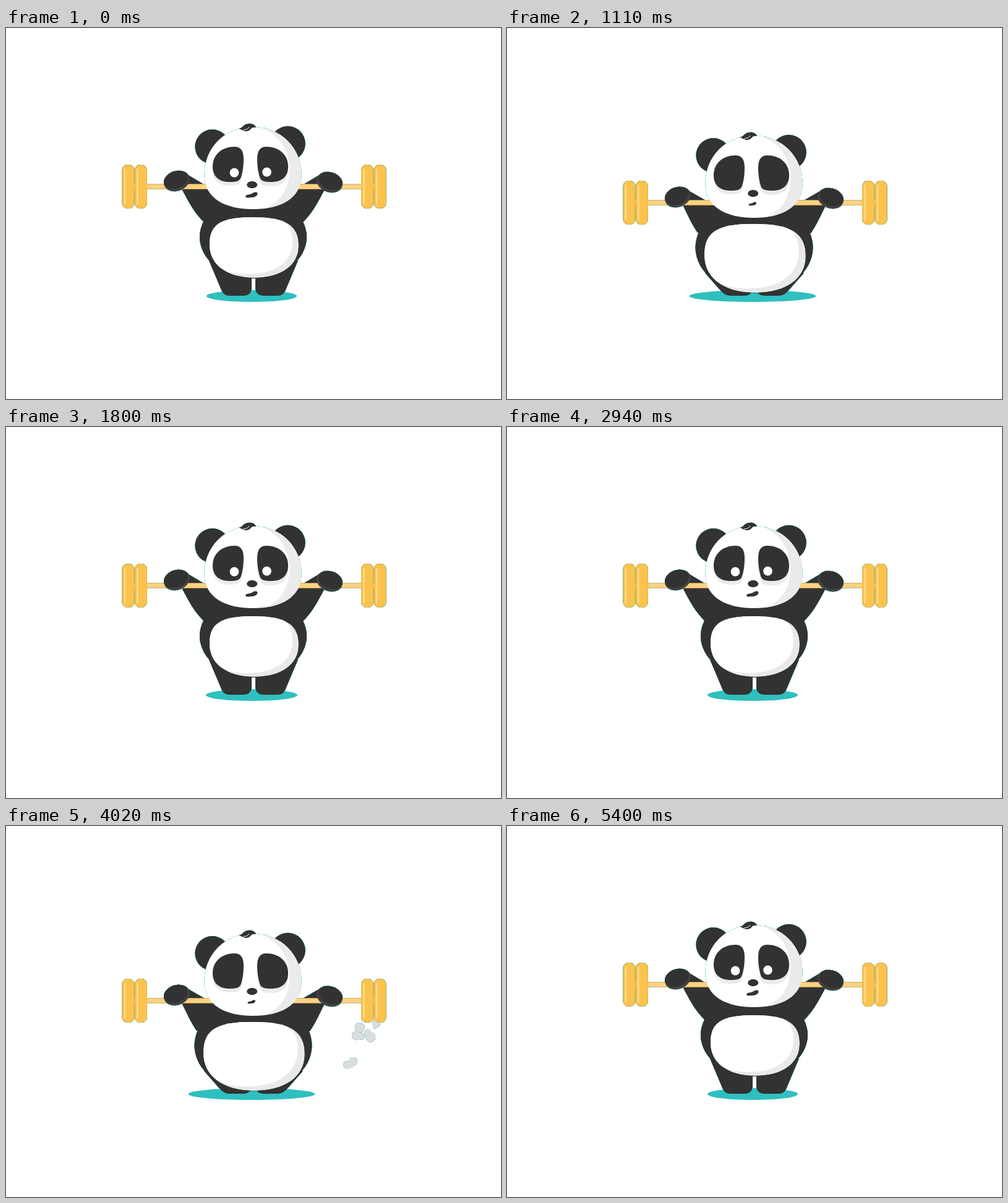
These frames come from a looping animation (800x600 px, 5.79 s). An HTML page:

```html
<!DOCTYPE html>
<html lang="en">
<head>
<meta charset="utf-8">
<title>Panda squats</title>
<style>
  html, body { margin: 0; width: 100%; height: 100%; overflow: hidden; background: #fff; }
  svg { display: block; width: 100vw; height: 100vh; }

  .drop, .grow, .arm, .leg, .pupil, .mouth, .ground, .puff {
    animation: 5790ms cubic-bezier(.333, 0, .667, 1) infinite;
  }
  .figure { filter: drop-shadow(0 0 .4px #18b4b8) drop-shadow(0 0 .3px #18b4b8); }
  .dark { fill: #323232; }
  .drop { animation-name: drop; }
  .grow { animation-name: drop, grow; }

  .head { --drop: 14px; }
  .bar { --drop: 26px; }
  .torso { --drop: 17px; --grow: 1.098; transform-origin: 399.5px 338px; }
  .belly { --drop: 17.5px; --grow: 1.137; transform-origin: 401px 355px; }

  .arm { animation-name: arm; }
  .leg { animation-name: leg; }
  .mouth { animation-name: mouth; }
  .pupil { animation-name: blink; transform-box: fill-box; transform-origin: center; }
  .ground { animation-name: spread; transform-origin: 397px 433.5px; }
  .puff {
    animation-name: puff; animation-timing-function: linear;
    transform-box: fill-box; transform-origin: center;
  }

  @keyframes drop {
    0%, 29.36%, 50.78%, 80.14%, 100% { translate: 0 0; }
    9.5%, 20.73%, 60.28%, 71.5% { translate: 0 var(--drop); }
  }
  @keyframes grow {
    0%, 27.81%, 50.78%, 78.58%, 100% { scale: 1; }
    9.5%, 21.33%, 60.28%, 72.11% { scale: var(--grow); }
  }
  @keyframes spread {
    0%, 32.3%, 50.78%, 83.07%, 100% { scale: 1 1; }
    9.67%, 20.73%, 60.45%, 71.5% { scale: 1.404 1; }
  }
  @keyframes arm {
    0%, 29.36%, 50.78%, 80.14%, 100% {
      d: path("M283 231 L330 259 L385 280 L385 310 L321 315 C305 300 296 283 285 262 Z");
    }
    9.5%, 20.73%, 60.28%, 71.5% {
      d: path("M283 257 L330 284 L385 296 L385 325 L308 331 C300 319 294 307 285 288 Z");
    }
  }
  @keyframes leg {
    0%, 27.81%, 50.78%, 78.58%, 100% {
      d: path("M328 376 L347 421 C350 429 353 433 362 433 L384 433 C392 433 397 428 397 420 L397 390 Z");
    }
    9.5%, 21.33%, 60.28%, 72.11% {
      d: path("M320 396 L342 421 C349 429 353 433 362 433 L383 433 C390 433 393 430 396 427 L397 400 Z");
    }
  }
  @keyframes blink {
    0%, 2.6%, 25%, 53.4%, 75.8%, 100% { scale: 1 1; }
    6.9%, 21.6%, 57.7%, 72.4% { scale: 1 0; }
  }
  @keyframes mouth {
    0%, 28%, 50.78%, 93.26%, 100% {
      d: path("M387 272 C388 269 394 270 398 267.5 C402 264.5 407 265 406.5 268 C406 272 401 274 396 274 C391 274.5 387 275 387 272 Z");
    }
    9.5%, 20.73%, 60.28%, 71.5% {
      d: path("M390.5 272 C390.5 270 393 270.5 397 269 C400 267 403.5 267 403 269.5 C402.5 272 400 273 396 273 C393 273.5 390.5 273.5 390.5 272 Z");
    }
    77%, 90.67% {
      d: path("M387.5 268 C387 266.5 399 267 405 267 C408 267 407 269 405 270.5 C402 273 397 273 394 273 C390 273 388 271 387.5 268 Z");
    }
  }
  @keyframes puff {
    0%, 56.13% { translate: calc(var(--dx) * -.271) calc(var(--dy) * -.271); scale: 0; }
    60.62% { translate: 0 0; scale: 1; }
    80.83%, 100% { translate: calc(var(--dx) * 1.219) calc(var(--dy) * 1.219); scale: 0; }
  }
</style>
</head>
<body>
<svg viewBox="0 0 800 600">
  <defs>
    <path id="face" d="M399 160 C445 160 477.5 195 477.5 237 C477.5 277 442 293 399 293 C356 293 320.5 277 320.5 237 C320.5 195 352 160 399 160 Z"/>
    <path id="tummy" d="M329 350 C329 317 348 306 400 306 C452 306 473 319 473 352 C473 384 445 404 401 404 C355 404 329 382 329 350 Z"/>
    <path id="patch" d="M334 224 C334 204 350 192 369 192 C380 192 384 199 384 212 C384 225 382 234 380 241 C378 248 372 249 361 249 C345 249 334 241 334 224 Z"/>
    <g id="plate">
      <rect x=".5" y="221.5" width="19" height="70" rx="8" fill="#fbc34d" stroke="#eeb34a" stroke-width=".8"/>
      <path d="M4.5 229 V284" stroke="#fdd98c" stroke-width="2.5" stroke-linecap="round"/>
    </g>
    <g id="hand">
      <ellipse cx="276" cy="247.5" rx="21.5" ry="16" transform="rotate(-20 276 247.5)" fill="#424242"/>
      <ellipse cx="274.5" cy="245.5" rx="20" ry="14" transform="rotate(-20 274.5 245.5)" class="dark"/>
    </g>
    <clipPath id="inFace"><use href="#face"/></clipPath>
    <clipPath id="inTummy"><use href="#tummy"/></clipPath>
  </defs>

  <ellipse class="ground" cx="397" cy="433.5" rx="73" ry="9.5" fill="#2fbfbf"/>

  <g class="figure">
    <g fill="#dcdcdc">
      <g class="puff" style="--dx:182px;--dy:-37px">
        <circle cx="498" cy="337" r="8"/><circle cx="506" cy="341" r="6.5"/><circle cx="498" cy="346" r="6"/>
      </g>
      <g class="puff" style="--dx:144px;--dy:-83px"><circle cx="495" cy="370" r="14"/></g>
      <g class="puff" style="--dx:133px;--dy:-92px"><circle cx="493" cy="388" r="13"/><circle cx="507" cy="390" r="10"/></g>
      <g class="puff" style="--dx:145px;--dy:-63px">
        <circle cx="513" cy="377" r="14"/><circle cx="504" cy="364" r="9"/>
      </g>
      <g class="puff" style="--dx:145px;--dy:-36px">
        <circle cx="488" cy="398" r="12"/><circle cx="470" cy="408" r="11"/><circle cx="480" cy="408" r="8"/>
      </g>
    </g>

    <g class="dark">
      <path class="leg"/>
      <path class="arm"/>
      <g transform="matrix(-1 0 0 1 800 0)"><path class="leg"/></g>
      <g transform="matrix(-1 0 0 1 799 1)"><path class="arm"/></g>
    </g>

    <g class="bar drop">
      <rect x="205" y="252.5" width="392" height="8" fill="#fdd283"/>
      <path d="M205 252.8 H597 M205 260.2 H597" stroke="#efb65a" stroke-width=".7"/>
      <use href="#plate" x="187.5"/>
      <use href="#plate" x="208"/>
      <use href="#plate" x="574"/>
      <use href="#plate" x="594.5"/>
    </g>

    <ellipse class="torso grow dark" cx="399.5" cy="338" rx="86.5" ry="67"/>
    <g class="belly grow">
      <g clip-path="url(#inTummy)">
        <use href="#tummy" fill="#e9e9e9"/>
        <use href="#tummy" x="-10" y="-6" fill="#fff"/>
        <path d="M329 306 H400 V380 H329 Z" fill="#fff"/>
      </g>
    </g>

    <g class="head drop">
      <g class="dark">
        <circle cx="333.5" cy="192" r="28"/>
        <circle cx="455.5" cy="187" r="28.2"/>
      </g>
      <use href="#face" fill="#fff"/>
      <g clip-path="url(#inFace)" fill="#ebebeb">
        <path d="M402 159 C440 166 460 200 458 232 C456 268 440 285 410 294 H480 V159 Z"/>
        <use href="#patch" y="6"/>
        <use href="#patch" transform="matrix(-1 0 0 1 790 7)"/>
      </g>
      <g class="dark">
        <use href="#patch"/>
        <use href="#patch" transform="matrix(-1 0 0 1 790 0)"/>
        <ellipse cx="397.7" cy="253.5" rx="8.5" ry="5.8"/>
        <path class="mouth"/>
        <path d="M376 162.5 C382 163 383 156 391 155 C398 154 403 157 404 161 C400 160 397 161 395 164 C393 167 387 168 383 166 C382 165 379 164 376 162.5 Z"/>
      </g>
      <path d="M383 165 Q391 164.5 393 160" fill="none" stroke="#fff"/>
      <circle class="pupil" cx="369" cy="234" r="7.4" fill="#fff"/>
      <circle class="pupil" cx="421.5" cy="233" r="7.4" fill="#fff"/>
    </g>

    <g class="bar drop">
      <use href="#hand"/>
      <use href="#hand" transform="matrix(-1 0 0 1 799 2)"/>
    </g>
  </g>
</svg>
</body>
</html>
```
